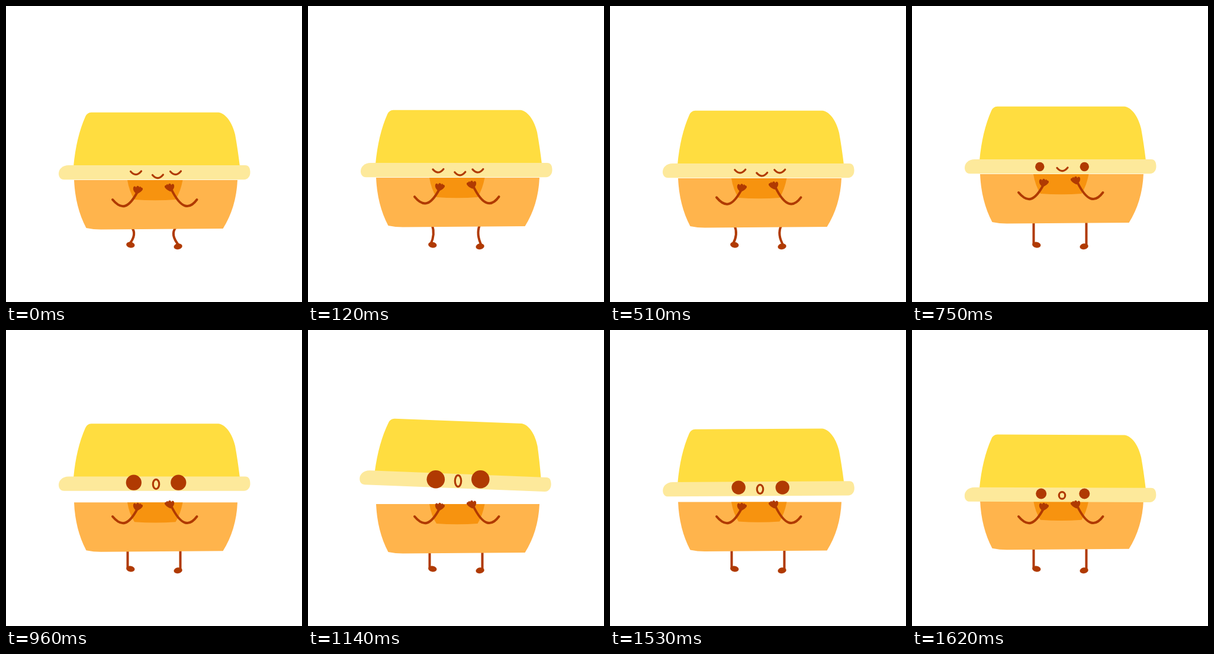
An HTML page that plays this animation: 500 px wide and 500 px high, repeating every 1.8 s.

```html
<!DOCTYPE html>
<html lang="en">
<head>
<meta charset="utf-8">
<title>Lunch box</title>
<style>
  html, body { margin: 0; width: 100%; height: 100%; overflow: hidden; background: #fff; }
  svg { display: block; width: 100vw; height: 100vh; }
  .line { fill: none; stroke: #b03a02; stroke-width: 4; stroke-linecap: round; }
  .thin { stroke-width: 3.2; }
  .ink { fill: #b03a02; }
</style>
</head>
<body>
<svg viewBox="0 0 500 500">
  <defs>
    <path id="hand" d="M221,317.5 C216,315 213.5,309 215.5,305.5 Q218,303 219.8,306.5 Q221,303 223,304 Q225,304 225.2,306.5 Q227,303 228,306.5 Q231.5,306.5 231,310 Q228,315 221,317.5Z"/>
    <path id="curve" d="M-9,-1.5 Q0,9 9,-2"/>
  </defs>

  <path id="legL" class="line"/>
  <path id="legR" class="line"/>
  <ellipse class="ink" rx="7.2" ry="4.9" transform="translate(210.3 403.5) rotate(10)"/>
  <ellipse class="ink" rx="7.2" ry="4.9" transform="translate(290.6 406.2) rotate(-10)"/>

  <g id="box">
    <path fill="#ffb44c" d="M115,294 H391 Q389,340 366.5,376 L160,377.5 Q148,377.5 135.5,375 Q117,340 115,294Z"/>
    <path fill="#f7930f" d="M205,294 H298.5 Q295,313 286.5,327 Q252,329.5 217,327 Q208,313 205,294Z"/>
  </g>

  <g id="lid">
    <path fill="#ffdd40" d="M114,271 Q118.5,222 134,187 Q137,180 144,179.8 H359 C373,182 383,200 387,217 Q391.5,242 395,271Z"/>
    <path fill="#fde99b" d="M106,269 C95,269 89,276 89,283 C89,289 92,293.2 98,293.2 H402 C408,293.2 413,288 412.5,280 C412,273 410,269 404,269Z"/>
  </g>

  <g id="shut" class="line thin">
    <use href="#curve" x="219.5" y="281"/>
    <use href="#curve" x="286.5" y="281"/>
  </g>
  <g id="open" class="ink">
    <circle id="eyeL"/>
    <circle id="eyeR" cx="291.3"/>
  </g>
  <use id="smile" class="line thin" href="#curve"/>
  <ellipse id="gasp" class="line thin" cx="253.5" rx="5.2"/>

  <g id="arms">
    <path class="line" d="M180,327 C195,345 207,342 222,314"/>
    <path class="line" d="M322.5,327 C310,344 296,344 279,309"/>
    <use class="ink" href="#hand"/>
    <use class="ink" href="#hand" transform="translate(499 -4) scale(-1 1)"/>
  </g>
</svg>
<script>
const LOOP = 1800, STEP = 30, LAST = 1620;
const WAKE = 600, POP = 810, GASP = 870, ROCK = 1020, CLOSE = 1410;
const $ = id => document.getElementById(id);

const ramp = (t, from, to) => Math.min(Math.max((t - from) / (to - from), 0), 1);
const mix = (a, b, p) => a + (b - a) * p;

// One even hop while asleep, then a quick stretch on waking.
const hop = t => t < WAKE ? 1 - Math.abs(t / 300 - 1) : ramp(t, WAKE, 750);

// The loose lid rocks like a damped spring, in degrees.
function rock(t) {
  const s = Math.max(t - ROCK, 0);
  return 3.45 * Math.exp(-s / 300) * Math.sin(Math.PI * s / 280);
}

function set(id, attrs) {
  for (const k in attrs) $(id).setAttribute(k, attrs[k]);
}
const show = (id, on) => set(id, { visibility: on ? "visible" : "hidden" });
const shift = (id, x, y) => set(id, { transform: `translate(${x} ${y})` });

function leg(id, x, footY, bend, top, knee, foot) {
  set(id, { d: `M${x + top * bend},${364 + 10 * bend} Q${x + knee * bend},${386} ${x + foot * bend},${footY}` });
}

function draw(time) {
  const t = Math.min(Math.floor((time % LOOP) / STEP) * STEP, LAST);
  const up = hop(t), bend = 1 - up;
  const pop = ramp(t, POP, ROCK), close = ramp(t, CLOSE, LAST);
  const pose = (rest, wide, end) => mix(mix(rest, wide, pop), end, close);
  const awake = t >= WAKE, gasping = t >= GASP;

  leg("legL", 205.5, 402, bend, 7, 16, 3);
  leg("legR", 294.5, 405, bend, -7.5, -18, -2);
  shift("box", 0, pose(-10 * up, 0, -6.2));
  set("lid", { transform: `translate(0 ${pose(-10 * up, -26, -2.8)}) rotate(${rock(t)} 251 236)` });
  shift("arms", 0, -12 * up);

  show("shut", !awake);
  shift("shut", up, -9 * up);
  show("open", awake);
  const cy = pose(281 - 9.5 * up, 252.2, 276.5), r = pose(7.7, 15.3, 9);
  set("eyeL", { cx: pose(215.8, 215.8, 218.2), cy, r });
  set("eyeR", { cy, r });

  show("smile", !gasping);
  shift("smile", awake ? 254 : 256.4 + up, pose(287 - 12 * up, 255, 279.4));
  show("gasp", gasping);
  set("gasp", { cy: pose(274, 255, 279.4), ry: pose(4, 9.7, 5.8) });
}

const start = performance.now();
function tick() {
  draw(performance.now() - start);
  requestAnimationFrame(tick);
}
tick();
</script>
</body>
</html>
```
